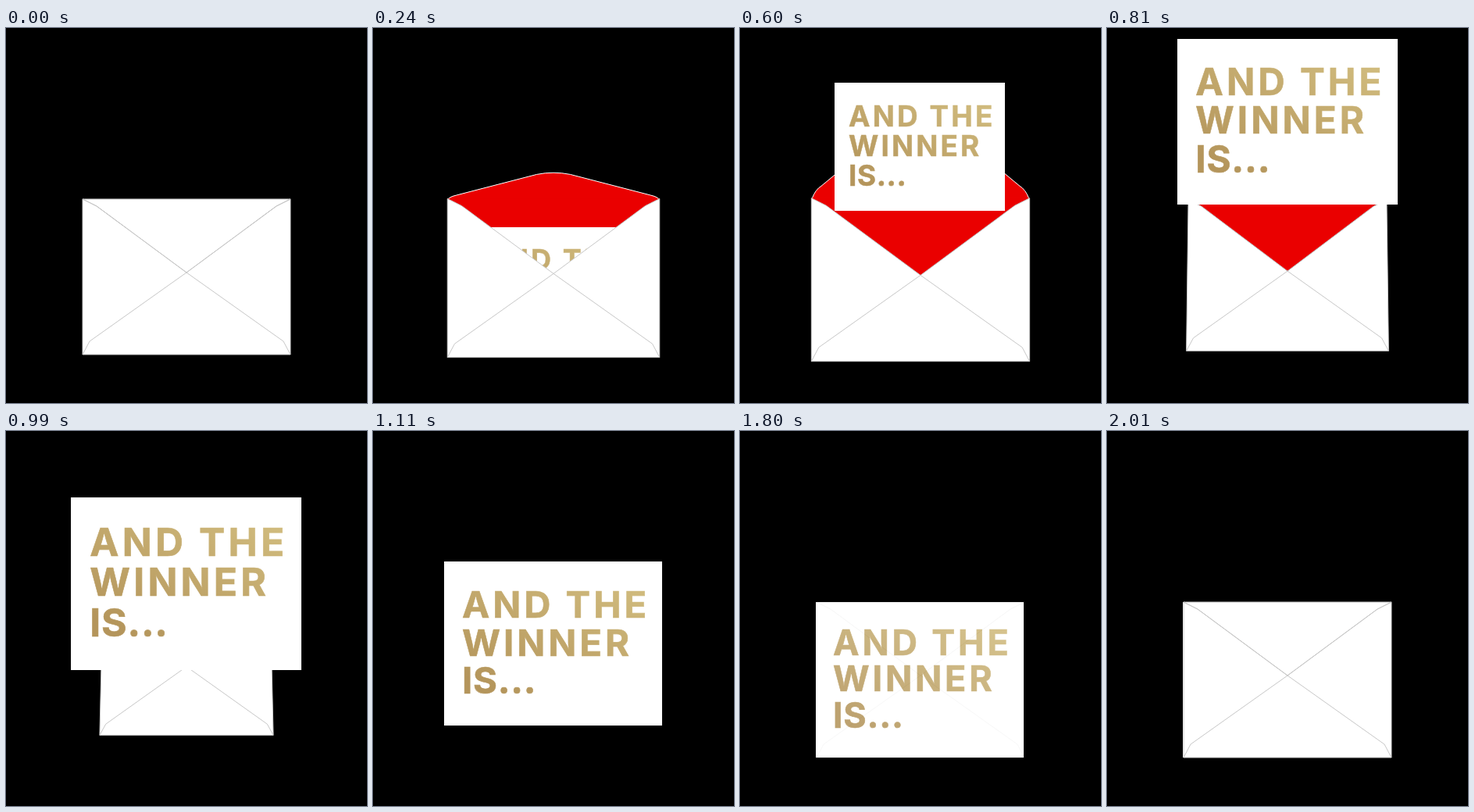
Animation of 462 by 480 pixels, one loop 2070 ms. Source, as an HTML page:

```html
<!DOCTYPE html>
<html lang="en">
<head>
<meta charset="utf-8">
<title>And the winner is</title>
<style>
  html, body { margin: 0; width: 100%; height: 100%; overflow: hidden; background: #000; }
  svg { display: block; width: 462px; height: 480px; }
  text { font: 700 45px Inter, "Open Sans", sans-serif; letter-spacing: 3.8px;
         fill: url(#gold); stroke: url(#gold); stroke-width: .6; }
  .red { fill: #ea0000; }
  .paper { fill: #fff; }
  .fold { fill: none; stroke: #c8c8c8; }
</style>
</head>
<body>
<svg id="stage" viewBox="0 0 462 480">
  <defs>
    <linearGradient id="gold" gradientUnits="userSpaceOnUse" x1="215" y1="15" x2="125" y2="190">
      <stop offset="0" stop-color="#d1bc7e"/>
      <stop offset="1" stop-color="#b4955b"/>
    </linearGradient>
  </defs>
  <g id="back">
    <path id="openFlap" class="red" stroke="#fff"/>
    <path id="lining" class="red"/>
  </g>
  <g id="card">
    <rect class="paper" width="266" height="199.8" shape-rendering="crispEdges"/>
    <text x="22" y="68">AND THE</text>
    <text x="22" y="114.5">WINNER</text>
    <text x="22" y="161" style="letter-spacing: .7px">IS...</text>
  </g>
  <g id="front">
    <path id="panel" class="paper"/>
    <path id="shutFlap" class="paper" stroke="#c8c8c8"/>
    <path id="folds" class="fold"/>
  </g>
</svg>
<script>
const LOOP = 2070, STEP = 30, LAST = 2010;
const CARD_OUT = 600, FALL = 810, LANDED = 1260, FADE = 1770, FADE_TIME = 240;
const $ = id => document.getElementById(id);
const stage = $('stage'), back = $('back'), card = $('card'), front = $('front');

// Sine ease from 0 to 1 between two times
function ease(t, from, to) {
  const p = Math.min(1, Math.max(0, (t - from) / (to - from)));
  return (1 - Math.cos(Math.PI * p)) / 2;
}

const cardTop = t => 256 - 242 * ease(t, 216, 780) + 204.6 * ease(t, FALL, LANDED);
const cardWidth = t => 213 + 84 * ease(t, 540, 915) - 31 * ease(t, 930, LANDED);
const envScale = t => 1 + .05 * ease(t, 0, 540) - .335 * ease(t, CARD_OUT, LANDED);
const envTilt = t => .034 * ease(t, CARD_OUT, 990);
const flapLift = t => -Math.cos(Math.PI * ease(t, 0, 425)); // -1 shut, 1 fully open

function drawEnvelope(scale, tilt, lift) {
  const pt = (x, y) => {
    const far = 1 - tilt * (418 - y) / 199;
    return (231 + (x - 231) * scale * far).toFixed(2) + ' ' + (244 + (y - 244) * scale).toFixed(2);
  };
  const line = (...pts) => 'M' + pts.map(p => pt(...p)).join('L');
  const set = (id, d) => $(id).setAttribute('d', d);

  const mouth = depth => [[98, 219], [116, 219 + 9 * depth], [231, 219 + 94 * depth],
                          [346, 219 + 9 * depth], [364, 219]];
  const edge = mouth(1);
  set('lining', lift > -1 ? line(...edge) + 'Z' : '');
  set('panel', line(...edge, [364, 418], [98, 418]) + 'Z');
  set('folds', line([98, 418], [107, 401], [231, 313], [355, 401], [364, 418])
             + line([98, 219], [98, 418], [364, 418], [364, 219]) + line(...edge));
  set('shutFlap', lift < 0 ? line(...mouth(-lift)) + 'Z' : '');

  // The flap runs on below the mouth so that no seam shows
  const up = (x, h) => pt(231 + x, 219 - 105 * lift * h);
  set('openFlap', lift > 0
    ? `M${up(-132, 0)}Q${up(-128, .1)} ${up(-121, .14)}L${up(-21, .93)}Q${up(0, 1.06)} ${up(21, .93)}`
      + `L${up(121, .14)}Q${up(128, .1)} ${up(132, 0)}L${pt(231, 300)}Z`
    : '');
}

function draw(t) {
  const fading = t > FADE, landed = t >= LANDED;
  const show = (el, on) => { el.style.display = on ? '' : 'none'; };

  const width = cardWidth(t), left = Math.round(230.4 - width / 2);
  card.setAttribute('transform', `translate(${left} ${cardTop(t)}) scale(${width / 266})`);
  stage.insertBefore(card, t < CARD_OUT || fading ? front : null);

  show(back, !landed);
  show($('openFlap'), t < FALL);
  show(front, !landed || fading);
  front.style.opacity = fading ? Math.min(1, (t - FADE) / FADE_TIME) : 1;

  if (landed) drawEnvelope(1, 0, -1);
  else drawEnvelope(envScale(t), envTilt(t), flapLift(t));
}

const start = performance.now();
function tick() {
  const t = (performance.now() - start) % LOOP;
  draw(Math.min(LAST, Math.floor(t / STEP) * STEP));
  requestAnimationFrame(tick);
}
tick();
</script>
</body>
</html>
```
